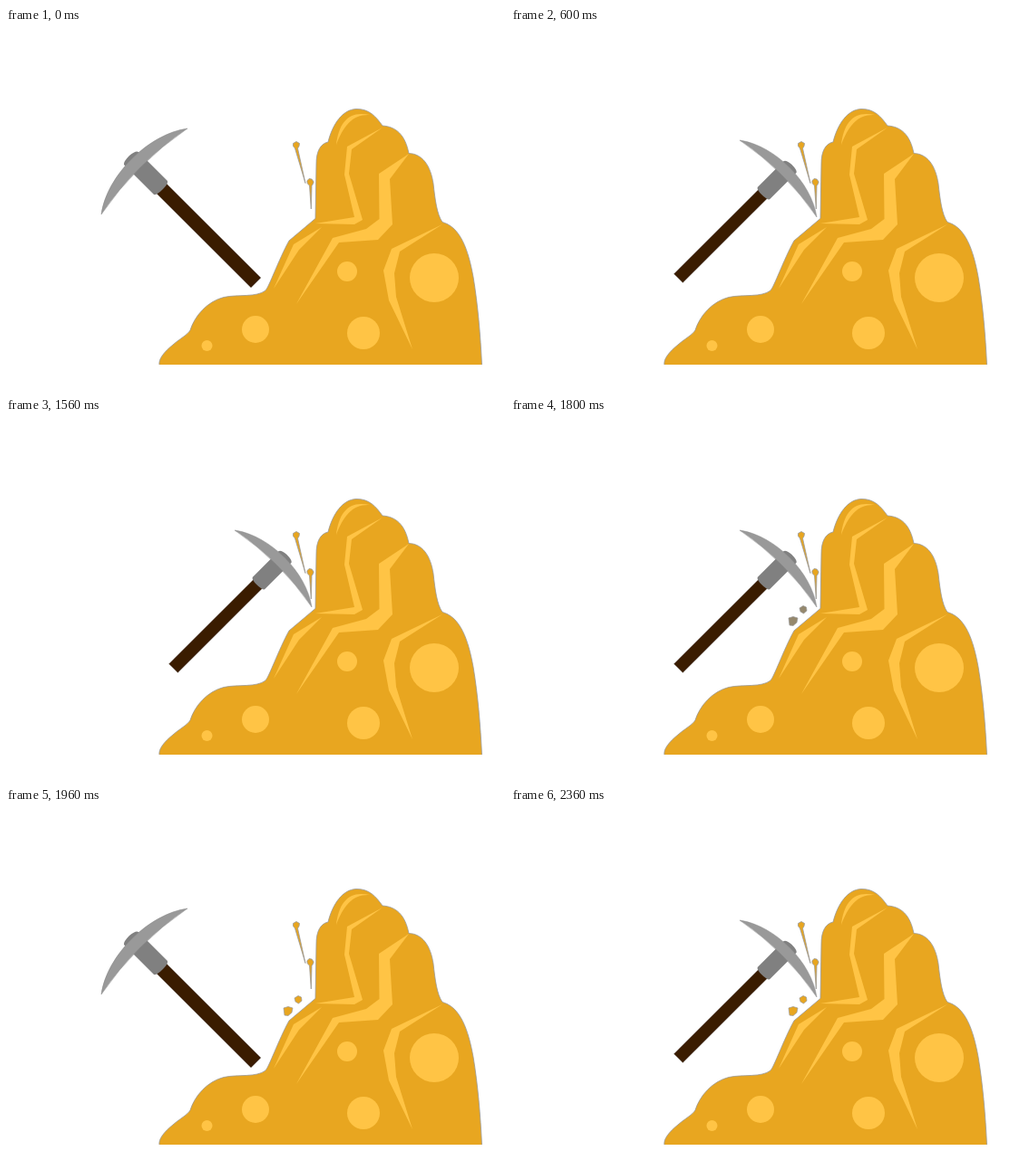
Write an HTML page that moves like this. It is 550x400 px and loops after 3.4 s.

```html
<!DOCTYPE html>
<html lang="en">
<head>
<meta charset="utf-8">
<title>Mining</title>
<style>
html, body { margin: 0; width: 100%; height: 100%; overflow: hidden; background: #fff; }
svg { display: block; width: 100vw; height: 100vh; }
</style>
</head>
<body>
<svg viewBox="0 0 550 400">
  <g fill="#e8a620" stroke="#999" stroke-width=".8">
    <path d="M169 372C168 366 174 358 184 350C192 343 200 339 203 334C208 318 222 302 240 297.500C256 294 276 298 286 290C290 286 300 257 312 235L341 210.500L342 150C342 137 346 128 355 126C360 106 371 90 386 89.500C400 89 408 98 415 108C430 109 440 118 444 138.500C459 139 468 152 471 172C473 190 475 206 481 214.500C501 220 509.500 245 515 275C520 305 523 340 524.500 372"/>
    <path d="M316.500 127.500L320 125.500L323.500 127.500L323 130.500L321.500 133L330 171.500L318.500 133L316.500 130.500Z"/>
    <path d="M331.800 169L334 166.500L337 167L339.200 170L338 173L337 174L336.300 200L334.500 174L332.300 172Z"/>
  </g>
  <g fill="#ffc445">
    <path d="M364 129C367 104 378 91 401 96C382 95 372 108 364 129Z"/>
    <path d="M415 110L376 131L373 162L384 209L341 216L384 217L393 212L378 161L381 134Z"/>
    <path d="M444 139L411 161L411.500 211L397 222L360 232L320 305L367 237L410 234L426 217L423 167Z"/>
    <path d="M348 220L317 239L295 288L323 245Z"/>
    <path d="M481 217L425 244L416 268L422 301L448 355L430 297L428 271L434 247Z"/>
    <circle cx="472" cy="276" r="27"/>
    <circle cx="394" cy="337" r="18"/>
    <circle cx="376" cy="269" r="11"/>
    <circle cx="275" cy="333" r="15"/>
    <circle cx="221.500" cy="351" r="6"/>
  </g>
  <g id="pick">
    <path fill="#3a1c00" d="M165 182L176 171L281 276L270 287Z" stroke="#999" stroke-width=".5"/>
    <path fill="#808080" d="M130 151Q129 148 136 141Q143 135 146 137L178 169Q179 172 173 178Q166 185 163 184Z"/>
    <path fill="#999" d="M105 206C111 163 157 117 200 111Q143.500 149.500 105 206Z" stroke="#888" stroke-width=".5"/>
  </g>
  <g id="chips" stroke="#999" stroke-width=".7">
    <path d="M318 210L322 207.500L325.500 209L326 213L322.500 216L319 214Z"/>
    <path d="M306 221L311 219.500L316 221L315 226L311 229.500L307 229Z"/>
  </g>
</svg>
<script>
const LOOP = 3400, STEP = 40;
const SWINGS = [[600, 1080], [1560, 1960], [2360, LOOP]];
const CHIPS_START = 1760, CHIPS_END = 1960;
const GRAY = [128, 128, 128], GOLD = [232, 166, 32];
const STRUCK = "matrix(-.895 0 0 .895 431 24.64)";
const pick = document.getElementById("pick");
const chips = document.getElementById("chips");

const mix = (a, b, k) => `rgb(${a.map((v, i) => Math.round(v + (b[i] - v) * k))})`;

function draw(t) {
  const struck = SWINGS.some(([from, to]) => t >= from && t < to);
  pick.setAttribute("transform", struck ? STRUCK : "translate(0 0)");

  // The chips warm from gray to gold in discrete steps.
  const age = Math.floor((t - CHIPS_START) / STEP) * STEP;
  const k = Math.max(0, Math.min(1, age / (CHIPS_END - CHIPS_START)));
  chips.setAttribute("visibility", t >= CHIPS_START ? "visible" : "hidden");
  chips.setAttribute("fill", mix(GRAY, GOLD, k));
}

const start = performance.now();
function tick() {
  draw((performance.now() - start) % LOOP);
  requestAnimationFrame(tick);
}
tick();
</script>
</body>
</html>
```
